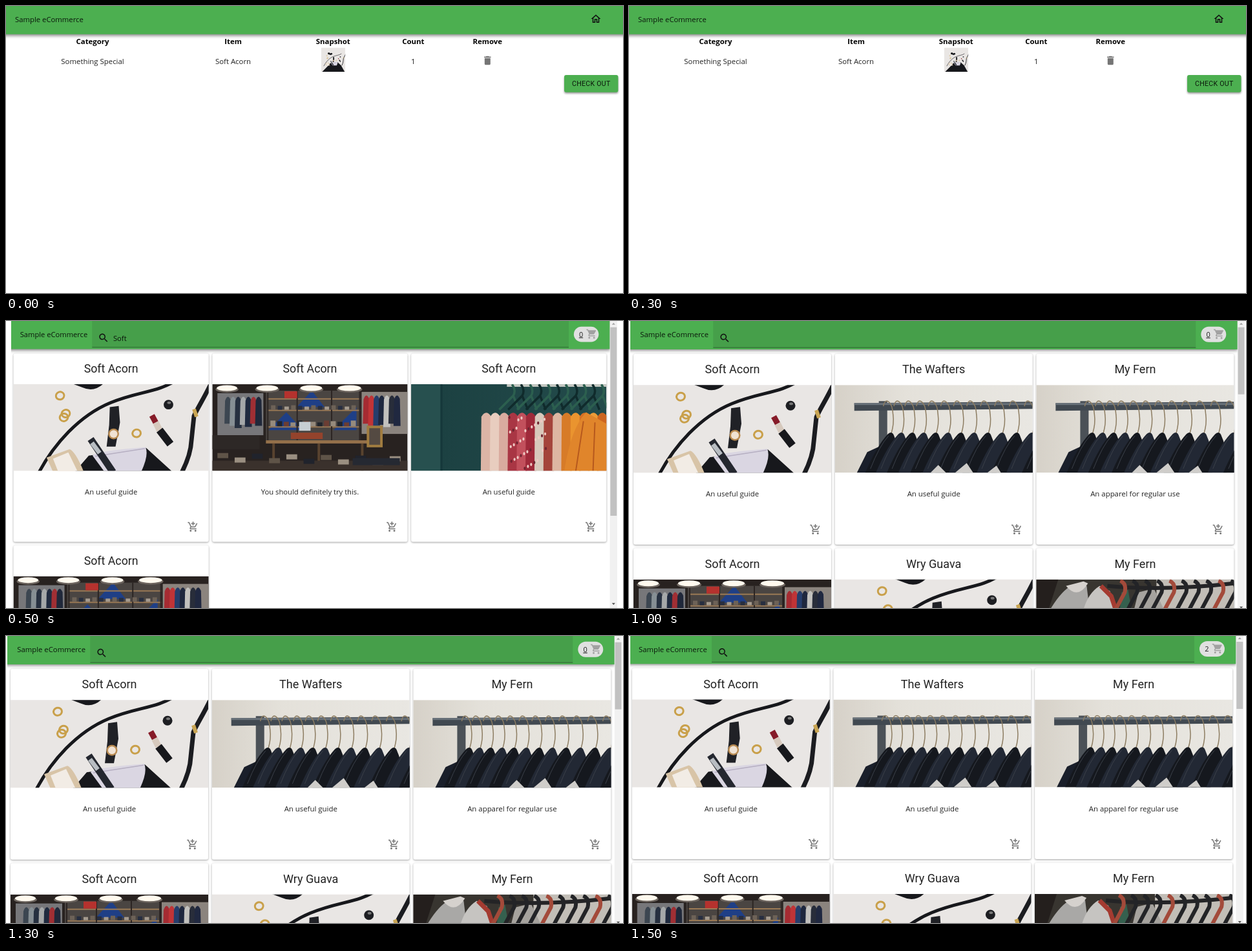
These frames come from a looping animation (955 px wide and 445 px high, 2 s). An HTML page with a canvas:

```html
<!DOCTYPE html>
<html lang="en">
<head>
<meta charset="utf-8">
<title>Sample eCommerce</title>
<style>
  html, body { margin: 0; width: 100%; height: 100%; overflow: hidden; background: #fff; }
  canvas { display: block; }
</style>
</head>
<body>
<canvas id="stage" width="955" height="445"></canvas>
<script>
const ctx = document.getElementById('stage').getContext('2d');
const SANS = '"Open Sans", "Noto Sans", sans-serif';
const ROBOTO = 'Roboto, sans-serif';
const GREEN = '#4caf50', INK = 'rgba(0,0,0,.87)', SOFT = 'rgba(0,0,0,.54)';

const ICONS = {
  search: 'M15.5 14h-.79l-.28-.27C15.41 12.59 16 11.11 16 9.5 16 5.91 13.09 3 9.5 3S3 5.91 3 9.5 5.91 16 9.5 16c1.61 0 3.09-.59 4.23-1.57l.27.28v.79l5 4.99L20.49 19l-4.99-5zm-6 0C7.01 14 5 11.99 5 9.5S7.01 5 9.5 5 14 7.01 14 9.5 11.99 14 9.5 14z',
  cart: 'M7 18a2 2 0 1 0 0 4 2 2 0 0 0 0-4zM1 2v2h2l3.6 7.59-1.35 2.45c-.16.28-.25.61-.25.96 0 1.1.9 2 2 2h12v-2H7.42c-.14 0-.25-.11-.25-.25l.03-.12.9-1.63h7.45c.75 0 1.41-.41 1.75-1.03l3.58-6.49c.08-.14.12-.31.12-.48 0-.55-.45-1-1-1H5.21l-.94-2H1zm16 16a2 2 0 1 0 0 4 2 2 0 0 0 0-4z',
  addCart: 'M11 9h2V6h3V4h-3V1h-2v3H8v2h3v3zm-4 9a2 2 0 1 0 0 4 2 2 0 0 0 0-4zm10 0a2 2 0 1 0 0 4 2 2 0 0 0 0-4zm-9.83-3.25l.03-.12.9-1.63h7.45c.75 0 1.41-.41 1.75-1.03l3.86-7.01L19.42 4h-.01l-1.1 2-2.76 5H8.53l-.13-.27L6.16 6l-.95-2-.94-2H1v2h2l3.6 7.59-1.35 2.45c-.16.28-.25.61-.25.96 0 1.1.9 2 2 2h12v-2H7.42c-.13 0-.25-.11-.25-.25z',
  home: 'M12 5.69l5 4.5V18h-2v-6H9v6H7v-7.81l5-4.5M12 3L2 12h3v8h6v-6h2v6h6v-8h3L12 3z',
  bin: 'M6 19c0 1.1.9 2 2 2h8c1.1 0 2-.9 2-2V7H6v12zM19 4h-3.5l-1-1h-5l-1 1H5v2h14V4z'
};

function rect(x, y, w, h, color) {
  ctx.fillStyle = color;
  ctx.fillRect(x, y, w, h);
}
function fill(d, color) {
  ctx.fillStyle = color;
  ctx.fill(new Path2D(d));
}
function stroke(d, color, width) {
  ctx.strokeStyle = color;
  ctx.lineWidth = width;
  ctx.stroke(new Path2D(d));
}
function oval(x, y, rx, ry, color) {
  ctx.fillStyle = color;
  ctx.beginPath();
  ctx.ellipse(x, y, rx, ry, 0, 0, 7);
  ctx.fill();
}
function text(s, x, y, font, color = INK, align = 'center') {
  ctx.font = font;
  ctx.fillStyle = color;
  ctx.textAlign = align;
  ctx.fillText(s, x, y);
}
function icon(name, x, y, color) {
  ctx.save();
  ctx.translate(x, y);
  ctx.scale(.75, .75);
  fill(ICONS[name], color);
  ctx.restore();
}
function raised(x, y, w, h, r, color, drop, blur, alpha) {
  ctx.save();
  ctx.shadowColor = `rgba(0,0,0,${alpha})`;
  ctx.shadowOffsetY = drop;
  ctx.shadowBlur = blur;
  ctx.fillStyle = color;
  ctx.beginPath();
  ctx.roundRect(x, y, w, h, r);
  ctx.fill();
  ctx.restore();
}
function garments(x, y, step, h, colors) {
  colors.forEach((c, i) => {
    const gx = x + i * step, drop = h + (i * 7) % 5 * h / 25;
    fill(`M${gx} ${y + 6}Q${gx + step / 2} ${y - 6} ${gx + step + 1} ${y + 5}L${gx + step + 2} ${y + drop}H${gx - 1}Z`, c);
  });
}

// Pictures are drawn in a 306 x 136 space.
const PHOTOS = {
  accessories() {
    rect(0, -85, 306, 310, '#e9e6e4');
    fill('M84 -4Q80 -24 102 -24L116 -12Q140 -26 144 -4Q128 14 108 5Z', '#17181c');
    stroke('M34 150C62 92 106 48 152 29S225 14 258 -8', '#17181c', 5);
    stroke('M312 -6C300 20 288 38 283 50L279 88Q278 112 262 142', '#1b1c20', 7);
    stroke('M283 39l4 12', '#c9a553', 6);
    for (const [x, y] of [[73, 18], [82, 46], [79, 52], [193, 77]]) {
      ctx.beginPath();
      ctx.ellipse(x, y, 6.5, 6, -.3, 0, 7);
      ctx.strokeStyle = '#c9a04a';
      ctx.lineWidth = 3;
      ctx.stroke();
    }
    oval(243, 32, 7.5, 7.5, '#1d1e22');
    oval(244, 29, 3, 2, '#777');
    stroke('M217 49L223 60', '#861b28', 9);
    stroke('M223 60L229 72', '#d6c9bd', 10);
    stroke('M229 72L246 94', '#17181c', 12);
    fill('M94 140L118 112 208 100 252 140 300 225H10Z', '#17181c');
    fill('M124 112Q128 105 207 99Q213 112 198 142H146Z', '#dad6e2');
    stroke('M128 113L206 101', '#b6afc2', 1.5);
    fill('M52 115L88 102Q98 106 112 142H64Z', '#d8c4a7');
    fill('M62 117L86 107 103 142H72Z', '#f2ece5');
    fill('M151 36L165 34 167 60 160 98H146L150 64Z', '#202126');
    oval(157, 78, 8.5, 8.5, '#b98b52');
    oval(157, 78, 6, 6, '#f0e2d3');
    stroke('M121 86L156 138', '#24272f', 11);
    stroke('M123 92l12 16', '#b8bdc2', 7);
  },
  hangers() {
    const wall = ctx.createLinearGradient(0, 0, 306, 0);
    wall.addColorStop(0, '#d6d1c8');
    wall.addColorStop(.35, '#e4e1da');
    wall.addColorStop(1, '#e9e7e2');
    rect(0, 0, 306, 136, wall);
    rect(68, 25, 13, 90, '#4b5157');
    fill('M30 28L306 26V37L30 40Z', '#414951');
    rect(30, 28, 276, 3, '#69727a');
    fill('M34 136L50 104 76 92 110 104 306 102V136Z', '#1a1f2a');
    for (let i = 0; i < 13; i++) {
      const x = 79 + i * 16 + i * i * .35;
      stroke(`M${x - 4} 33Q${x - 2} 22 ${x + 4} 26T${x + 11} 46Q${x + 13} 60 ${x + 8} 76`, '#8d7d62', 1.5);
      fill(`M${x + 3} 76Q${x + 10} 70 ${x + 13} 80Q${x + 22} 100 ${x + 21} 136H${x - 32}Q${x - 14} 94 ${x + 3} 76Z`, i % 2 ? '#222834' : '#15181e');
      stroke(`M${x + 4} 79Q${x - 10} 94 ${x - 24} 130`, '#3b4049', 1);
    }
    fill('M148 136L160 124 172 136ZM186 136L204 121 214 136ZM236 136L250 125 257 136Z', '#cfcdca');
  },
  store() {
    rect(0, 0, 306, 136, '#282220');
    rect(8, 14, 72, 66, '#77777a');
    rect(84, 10, 148, 78, '#4a4542');
    rect(234, 12, 72, 66, '#8b847e');
    fill('M88 72L116 44 142 72ZM132 36L156 10 176 36ZM190 72L226 36V72Z', '#1f3f86');
    for (const y of [22, 40, 66]) rect(86, y, 146, 2, '#9b7a55');
    for (const x of [86, 132, 186, 230]) rect(x, 10, 2, 82, '#2c2523');
    for (let i = 0; i < 13; i++) {
      rect(92 + i * 10.5, 33 + i % 3, 7, 7 - i % 3, ['#6d6257', '#272e40', '#a49a8e'][i % 3]);
      rect(91 + i * 10.5, 57 + i % 4, 8, 9 - i % 4, ['#968b7d', '#20242c', '#6b3d33'][i % 3]);
    }
    rect(113, 11, 20, 11, '#b5322e');
    for (const [x, w] of [[23, 16], [86, 17], [155, 17], [215, 18]]) {
      oval(x, 8, w + 2, 5, '#6d655f');
      oval(x, 6, w, 4.5, '#fff9ee');
    }
    garments(20, 20, 8, 42, ['#3c4651', '#868f94', '#263040', '#a5a8a9', '#1f2a3f', '#a02f34', '#20283a']);
    garments(237, 18, 8, 44, ['#a52b32', '#c03437', '#263d6b', '#1e273e', '#c2c1be', '#282d3a', '#202840']);
    rect(0, 80, 74, 22, '#2d2826');
    rect(84, 88, 164, 5, '#94704a');
    for (const x of [94, 165, 233]) rect(x, 93, 4, 43, '#59432f');
    rect(123, 76, 50, 10, '#94432c');
    rect(136, 59, 18, 14, '#c7ced3');
    rect(242, 65, 25, 34, '#a07c40');
    rect(246, 69, 17, 26, '#544a42');
    rect(0, 120, 306, 16, '#3a312c');
    for (let i = 0; i < 11; i++) rect(8 + i * 27, 108 + i * 7 % 13, 17, 8, ['#5f5448', '#9a8f81', '#20232c'][i % 3]);
    rect(220, 116, 74, 11, '#252932');
  },
  dresses() {
    const wall = ctx.createLinearGradient(46, 0, 306, 0);
    wall.addColorStop(0, '#1c4142');
    wall.addColorStop(1, '#234b4b');
    rect(0, 0, 306, 136, wall);
    rect(0, 0, 46, 136, '#27504f');
    rect(46, 0, 3, 136, '#15373a');
    rect(150, 0, 156, 4, '#c5c8c2');
    for (let i = 0; i < 11; i++) {
      const x = 158 + i * 14;
      stroke(`M${x} 0Q${x + 7} 9 ${x + 2} 18L${x - 20} 40M${x + 2} 18L${x + 11} 40`, i % 2 ? '#102b2c' : '#2c5f4f', 3.5);
    }
    garments(110, 45, 14, 100, ['#dcb5a6', '#e8cdbf', '#d9ab9f', '#a93644', '#c2505c', '#9f2a3a', '#d8c8bb', '#a4443b', '#ddb6a2', '#d77b28', '#ea942f', '#d66f24', '#ec9b38', '#cd6520']);
    for (let i = 0; i < 36; i++) oval(154 + i * 11 % 60, 52 + i * 17 % 82, 1.6, 2.5, i % 3 ? '#efcac4' : '#6f2430');
    fill('M240 136Q250 70 274 44L306 62V136Z', '#e0852b');
    stroke('M258 136L270 58M285 136L288 60', '#b6581d', 2);
  },
  sweaters() {
    rect(0, 0, 306, 136, '#383530');
    rect(186, 0, 120, 136, '#c2beb7');
    fill('M0 0H34L18 50 0 60Z', '#241f1d');
    fill('M14 60Q36 18 57 8L78 10 84 60Z', '#a9a8a6');
    fill('M46 10Q64 32 80 6L73 3Z', '#d5d1cd');
    fill('M70 60Q76 24 98 10L114 18 126 60Z', '#c6c4c1');
    stroke('M100 10L116 26 124 50', '#a43b31', 7);
    fill('M128 60L132 20 142 16 150 60Z', '#35604e');
    fill('M148 60L158 20 182 14 204 60Z', '#a6a39e');
    stroke('M110 10Q200 18 306 6', '#242426', 6);
    for (let i = 0; i < 10; i++) {
      const x = 130 + i * 19;
      stroke(`M${x} 2Q${x + 10} 6 ${x + 7} 20L${x - 9} 50`, i % 4 ? '#232427' : '#a34a3a', 6);
    }
  }
};

function photo(name, x, y, scale = 1, top = 0, height = 136) {
  ctx.save();
  ctx.translate(x, y);
  ctx.scale(scale, scale);
  ctx.beginPath();
  ctx.rect(0, top, 306, height);
  ctx.clip();
  PHOTOS[name]();
  ctx.restore();
}

const GUIDE = 'An useful guide';
const catalogue = [
  ['Soft Acorn', 'accessories', GUIDE], ['The Wafters', 'hangers', GUIDE], ['My Fern', 'hangers', 'An apparel for regular use'],
  ['Soft Acorn', 'store', ''], ['Wry Guava', 'accessories', ''], ['My Fern', 'sweaters', '']
];
const results = [
  ['Soft Acorn', 'accessories', GUIDE], ['Soft Acorn', 'store', 'You should definitely try this.'], ['Soft Acorn', 'dresses', GUIDE],
  ['Soft Acorn', 'store', '']
];

function card([title, picture, about], i) {
  const x = 4.7 + i % 3 * 311.7, y = 50 + Math.floor(i / 3) * 301.5;
  raised(x, y, 306, 296, 3, '#fff', 1, 3, .38);
  text(title, x + 153, y + 30.5, `18px ${ROBOTO}`);
  photo(picture, x, y + 48.5);
  text(about, x + 153, y + 221.5, `11.4px ${SANS}`);
  icon('addCart', x + 272.5, y + 263.5, SOFT);
}

function shop({ left, dx, dy, scale = 1, cards, query = '', count, thumb = 104 }) {
  ctx.save();
  ctx.beginPath();
  ctx.rect(left, 0, 955, 445);
  ctx.clip();
  ctx.translate(dx, dy);
  ctx.scale(scale, scale);
  cards.forEach(card);

  raised(-20, -10, 959.5, 53.3, 0, GREEN, 2, 5, .5);
  text('Sample eCommerce', 15, 24.5, `11.3px ${SANS}`, INK, 'left');
  rect(128, -2, 747, 42.5, '#469f4a');
  rect(128, 40, 747, 1, '#2b642e');
  icon('search', 136.9, 16.8, '#111');
  text(query, 161, 30.3, `11.4px ${SANS}`, INK, 'left');
  raised(883, 8, 39, 24, 12, '#e0e0e0', 0, 0, 0);
  text(count, 894.3, 24, `11px ${SANS}`);
  if (count === '0') rect(891, 25, 6.5, 1, INK);
  icon('cart', 902, 10.5, '#a1a1a1');

  rect(939.5, -2, 11.5, 460, '#f1f1f1');
  rect(940.3, 9, 10, thumb, '#c1c1c1');
  fill('M942.7 5L945.3 2 947.9 5Z', '#a3a3a3');
  fill('M942.7 442L945.3 445 947.9 442Z', '#505050');
  rect(951, -2, 20, 460, '#fff');
  ctx.restore();
}

function basket() {
  raised(-10, -10, 975, 53.7, 0, GREEN, 2, 5, .5);
  text('Sample eCommerce', 14, 25, `11.3px ${SANS}`, INK, 'left');
  icon('home', 904, 11, '#111');
  const columns = [[134, 'Category', 'Something Special'], [351.5, 'Item', 'Soft Acorn'], [506.3, 'Snapshot', ''], [630.3, 'Count', '1'], [745.3, 'Remove', '']];
  for (const [x, head, value] of columns) {
    text(head, x, 59, `bold 11.4px ${SANS}`, '#000');
    text(value, x, 89.5, `11.4px ${SANS}`);
  }
  photo('accessories', 487.7, 74.9, .1225, -85, 306);
  icon('bin', 736.3, 75.4, SOFT);
  raised(864, 107, 83.5, 26.7, 3, GREEN, 2, 3, .4);
  ctx.letterSpacing = '0.25px';
  text('CHECK OUT', 905.8, 124, `10.6px ${ROBOTO}`);
  ctx.letterSpacing = '0px';
}

const scenes = [
  basket,
  () => shop({ left: 8, dx: 6.9, dy: .8, scale: .9875, cards: results, query: 'Soft', count: '0', thumb: 296 }),
  () => shop({ left: 2, dx: 2.3, dy: .7, cards: catalogue, count: '0' }),
  () => shop({ left: 2, dx: 0, dy: 0, cards: catalogue, count: '2' })
];

function frame() {
  rect(0, 0, 955, 445, '#fff');
  scenes[Math.floor(performance.now() % 2000 / 500)]();
  requestAnimationFrame(frame);
}
frame();
</script>
</body>
</html>
```
